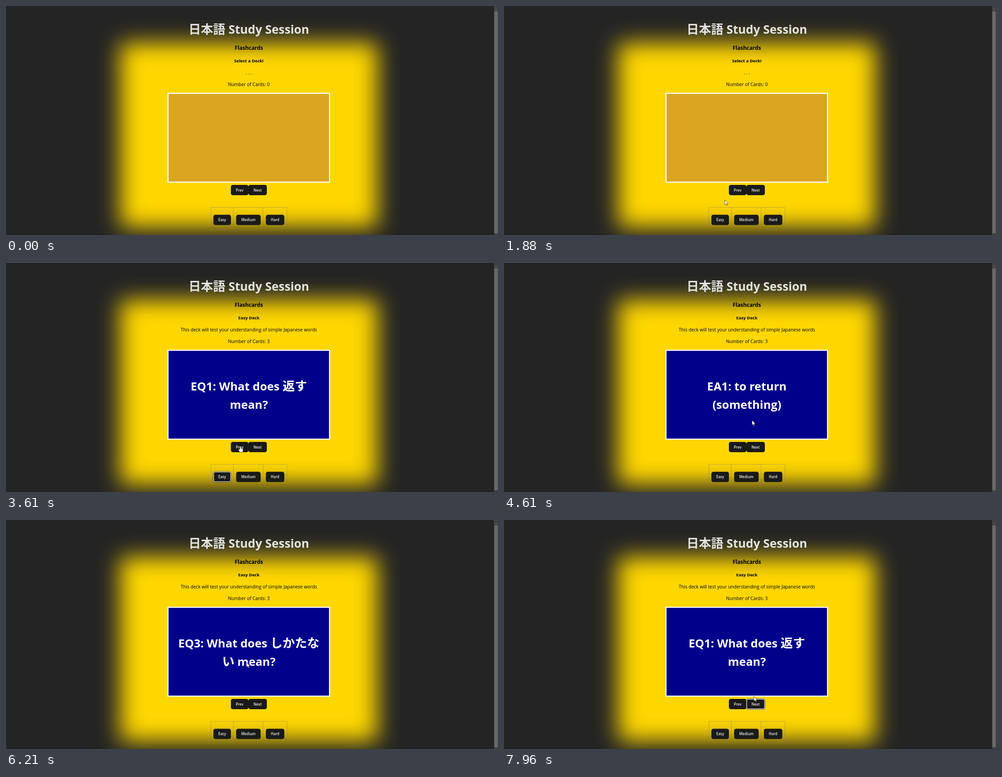
These frames come from a looping animation (1094x512 px, 8000 ms). An HTML page:

```html
<!DOCTYPE html>
<html lang="ja">
<head>
<meta charset="utf-8">
<title>Study Session</title>
<style>
  html, body { margin: 0; width: 100%; height: 100%; overflow: hidden; background: #242424; }
  svg { display: block; width: 100vw; height: 100vh; }
  text { font-family: "Open Sans", "Noto Sans", "Noto Sans CJK JP", "Noto Sans CJK", sans-serif; text-anchor: middle; }
  .title { font-size: 26.3px; font-weight: 700; fill: #e3e3e1; }
  .card { font-size: 25.6px; font-weight: 700; fill: #fff; }
  .cjk { font-family: "Noto Sans CJK JP", "Noto Sans CJK", sans-serif; font-size: 27.3px; }
  .heading { font-size: 11.9px; font-weight: 700; }
  .deck { font-size: 9.55px; font-weight: 700; }
  .body { font-size: 10.2px; }
  .button text { font-size: 8.05px; font-weight: 600; fill: #f0f0e4; }
  .button rect { fill: #1a1a1a; }
  .ring { fill: none; visibility: hidden; }
</style>
</head>
<body>
<svg viewBox="0 0 1094 512" preserveAspectRatio="none">
  <defs>
    <filter id="soft" filterUnits="userSpaceOnUse" x="140" y="-30" width="800" height="640" color-interpolation-filters="sRGB">
      <feGaussianBlur stdDeviation="25"/>
    </filter>
  </defs>

  <rect width="1094" height="512" fill="#242424"/>
  <rect x="254" y="83" width="572" height="412" fill="#ffd700" filter="url(#soft)"/>

  <rect x="1085" width="9" height="512" fill="#424242"/>
  <rect x="1086" y="12" width="7.5" height="496" fill="#686868"/>
  <path d="M1087.5 8.5L1089.7 6L1092 8.5z" fill="#686868"/>

  <text class="title" x="540" y="61.6"><tspan class="cjk">日本語</tspan> Study Session</text>
  <text class="heading" x="540" y="98.3">Flashcards</text>
  <text class="deck" id="deckName" x="540" y="126"></text>
  <text class="body" id="deckInfo" x="540" y="152.7"></text>
  <text class="body" id="deckSize" x="540" y="179"></text>

  <rect id="face" x="360.2" y="195.2" width="359.2" height="198.6" stroke="#fff" stroke-width="2.4"/>
  <g class="card" data-card="EQ1">
    <text x="540" y="285">EQ1: What does <tspan class="cjk">返す</tspan></text>
    <text x="540" y="325.5">mean?</text>
  </g>
  <g class="card" data-card="EA1">
    <text x="540" y="285">EA1: to return</text>
    <text x="540" y="325.5">(something)</text>
  </g>
  <g class="card" data-card="EQ3">
    <text x="540" y="285">EQ3: What does <tspan class="cjk">しかたな</tspan></text>
    <text x="540" y="325.5"><tspan class="cjk">い</tspan> mean?</text>
  </g>
  <g class="card" data-card="EA3">
    <text x="540" y="305">EA3: It can't be helped</text>
  </g>

  <path d="M455.3 495V450.4H624.8V495M505.6 450V495M571.6 450V495" fill="none" stroke="#808080" stroke-opacity=".6" stroke-width=".8"/>
  <g id="buttons"></g>

  <circle id="click" r="9" fill="#ff0" fill-opacity=".5"/>
  <g id="pointer" fill="#fff" stroke="#222" stroke-width=".7" stroke-linejoin="round">
    <path id="arrow" d="M0 0V10.6L2.5 8.4L4.1 12L5.8 11.3L4.2 7.8H7.5z"/>
    <path id="hand" d="M-1.3 7V.7Q-1.3 -.6 -.1 -.6T1.1 .7V4.2Q2.3 3.6 2.9 4.7Q4 4.2 4.5 5.3Q6 5 6 6.5V9.2Q6 11 4.8 12.8H-.9Q-2.5 10.2 -4.4 7.8Q-4.6 6.2 -3 6.5z"/>
  </g>
</svg>
<script>
const LOOP = 8000, STEP = 66.95, STEP_OFFSET = 448;
const CENTER = 540, BUTTON_H = 23;
const $ = id => document.getElementById(id);

// Centred rows of buttons
function buttonRow(y, gap, widths) {
  const entries = Object.entries(widths);
  const total = entries.reduce((sum, [, w]) => sum + w + gap, -gap);
  let left = CENTER - total / 2;
  return entries.map(([label, w]) => {
    const button = { label, x: left, y, w };
    left += w + gap;
    return button;
  });
}

const buttons = [
  ...buttonRow(400, 0, { Prev: 39, Next: 41 }),
  ...buttonRow(466.7, 11.6, { Easy: 39, Medium: 54.5, Hard: 41 }),
];

function outline({ x, y, w }, inset, stroke, width) {
  return `<rect x="${x + inset}" y="${y + inset}" width="${w - 2 * inset}" height="${BUTTON_H - 2 * inset}"
    rx="${4.5 - inset}" stroke="${stroke}" stroke-width="${width}"/>`;
}

$("buttons").innerHTML = buttons.map(b => `
  <g class="button">
    ${outline(b, 0, "none", 0)}
    <text x="${b.x + b.w / 2}" y="${b.y + 14.6}">${b.label}</text>
  </g>
  <g class="ring" id="ring${b.label}">${outline(b, -.5, "#111", 1)}${outline(b, .5, "#fff", 1.3)}</g>`).join("");

const linear = p => p, easeIn = p => p ** 1.7, easeOut = p => 1 - (1 - p) ** 2;

// Pointer moves: x runs evenly, y follows the easing
const entry = { x: 1036, y: 495 };
const moves = [
  { from: 460, to: 1200, x: 619, y: 304, ease: easeOut },
  { from: 1200, to: 1890, x: 484, y: 441, ease: linear },
  { from: 1890, to: 2400, x: 481, y: 474, ease: linear },
  { from: 3200, to: 3870, x: 549, y: 317, ease: easeIn },
  { from: 4410, to: 5280, x: 561, y: 407, ease: easeOut },
  { from: 5610, to: 6210, x: 535, y: 318, ease: linear },
  { from: 6210, to: 7230, x: 562, y: 408, ease: easeIn },
  { from: 7830, to: 7960, x: 555, y: 393, ease: linear },
];

// Each click moves the focus, flashes a spot, then changes the card
const FOCUS_LEAD = 75, FLASH = 70;
const clicks = [
  { at: 2870, focus: "Easy", card: "EQ1" },
  { at: 4270, focus: "", card: "EA1" },
  { at: 5350, focus: "Next", card: "EQ3" },
  { at: 6280, focus: "", card: "EA3" },
  { at: 7490, focus: "Next", card: "EQ1" },
];

const lastClick = t => clicks.findLast(c => t >= c.at);
const show = (el, on) => { el.style.visibility = on ? "visible" : "hidden"; };

function pointerAt(t) {
  const time = STEP_OFFSET + Math.floor((t - STEP_OFFSET) / STEP) * STEP;
  let { x, y } = entry;
  for (const m of moves) {
    const p = Math.min(1, Math.max(0, (time - m.from) / (m.to - m.from)));
    x += (m.x - x) * p;
    y += (m.y - y) * m.ease(p);
    if (p < 1) break;
  }
  return { x, y };
}

function draw(now) {
  const t = now % LOOP;
  const card = lastClick(t - FLASH)?.card;
  const focused = lastClick(t + FOCUS_LEAD)?.focus;

  $("deckName").textContent = card ? "Easy Deck" : "Select a Deck!";
  $("deckInfo").textContent = card ? "This deck will test your understanding of simple Japanese words" : ". . .";
  $("deckSize").textContent = `Number of Cards: ${card ? 3 : 0}`;
  $("face").setAttribute("fill", card ? "#00008b" : "#daa520");
  document.querySelectorAll("[data-card]").forEach(el => show(el, el.dataset.card === card));
  buttons.forEach(({ label }) => show($("ring" + label), label === focused));

  const { x, y } = pointerAt(t), visible = t >= moves[0].from;
  const over = buttons.some(b => x >= b.x && x <= b.x + b.w && y >= b.y && y <= b.y + BUTTON_H);
  for (const id of ["pointer", "click"]) $(id).setAttribute("transform", `translate(${x} ${y})`);
  show($("arrow"), visible && !over);
  show($("hand"), visible && over);
  show($("click"), lastClick(t) !== lastClick(t - FLASH));
}

const start = performance.now();
function tick() {
  draw(performance.now() - start);
  requestAnimationFrame(tick);
}
tick();
</script>
</body>
</html>
```
